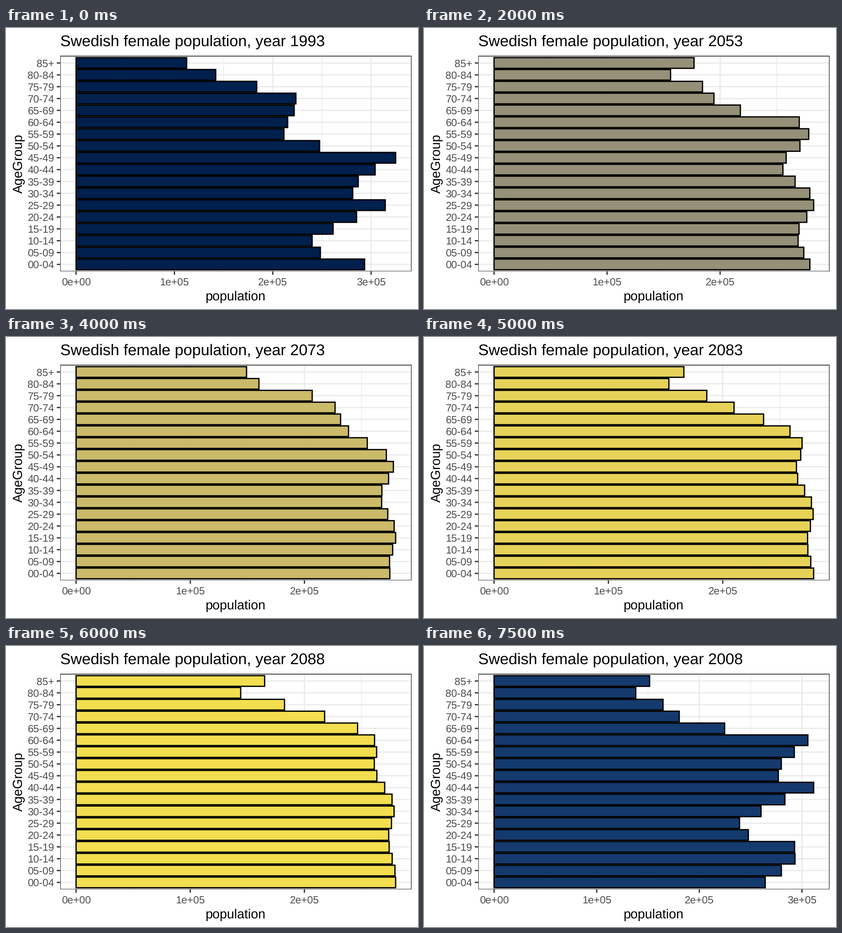
Recreate the animation shown at these times as a matplotlib script. Size 904 by 619 pixels, loop 8 s.

```python
import numpy as np
import matplotlib.pyplot as plt
from matplotlib.animation import FuncAnimation
from matplotlib.colors import LinearSegmentedColormap
from matplotlib.patches import Rectangle

plt.rcParams.update({
    "font.family": "Liberation Sans",
    "text.hinting": "none",
    "path.snap": False,
})

W, H, DPI = 904, 619, 72            # at 72 dpi one point is one pixel
LEFT, RIGHT, TOP, BOTTOM = 118.7, 890.0, 61.4, 536.4
THICK, THIN, TICK = 2.78, 1.39, 7.2
GRID, DARK, GREY = "#ebebeb", "#333333", "#4d4d4d"

# Women by five-year age group in the first year (thousands)
START = np.array([293.395, 248.369, 240.012, 261.346, 285.209, 314.388,
                  281.290, 286.923, 304.108, 324.946, 247.613, 211.351,
                  215.140, 221.764, 223.506, 183.654, 141.990, 112.424])
# Person-years lived per age group in the life table (thousands)
LIVED = np.array([497.487, 497.138, 496.901, 496.531, 495.902, 495.168,
                  494.213, 492.760, 490.447, 486.613, 480.665, 471.786,
                  457.852, 436.153, 402.775, 350.358, 271.512, 291.707])
# Yearly births per woman, ages 15-19 to 45-49
FERTILITY = np.array([.0120, .0908, .1499, .1125, .0441, .0074, .0003])
GIRLS = 1 / 2.05


def project(pop):
    """Move the population five years ahead."""
    nxt = np.empty_like(pop)
    nxt[1:-1] = pop[:-2] * LIVED[1:-1] / LIVED[:-2]
    nxt[-1] = (pop[-2] + pop[-1]) * LIVED[-1] / (LIVED[-2] + LIVED[-1])
    mothers = (pop[3:10] + nxt[3:10]) / 2
    nxt[0] = 5 * GIRLS * (FERTILITY @ mothers) * LIVED[0] / 500
    return nxt


pops = [START]
for _ in range(20):
    pops.append(project(pops[-1]))

# Steps play in alphabetical order of their number: 1, 10, 11, ... 19, 2, 20 ...
ORDER = sorted(range(1, 22), key=str)[:16]

cividis = LinearSegmentedColormap.from_list("steps", [
    "#00204d", "#00336f", "#39486b", "#575c6d", "#707173",
    "#8a8779", "#a69d75", "#c4b56c", "#e4cf5b", "#ffea46"], N=1024)

fig = plt.figure(figsize=(W / DPI, H / DPI), dpi=DPI, facecolor="white")
ax = fig.add_axes([0, 0, 1, 1])
ax.set(xlim=(0, W), ylim=(H, 0))
ax.axis("off")

panel = Rectangle((LEFT, TOP), RIGHT - LEFT, BOTTOM - TOP,
                  fc="none", ec=DARK, lw=THICK, zorder=5)
ax.add_patch(panel)
panel.set_clip_path(Rectangle((LEFT, TOP), RIGHT - LEFT, BOTTOM - TOP,
                              transform=ax.transData))

ZERO = LEFT + (RIGHT - LEFT) * 0.05 / 1.1
SPAN = (RIGHT - LEFT) / 1.1
STEP = (BOTTOM - TOP) / 18.2


def line(xs, ys, color, width, z):
    return ax.plot(xs, ys, color=color, lw=width, zorder=z,
                   solid_capstyle="butt")[0]


def label(x, y, text, size, color="black", ha="center", **kw):
    return ax.text(x, y, text, size=size, color=color, ha=ha,
                   va="baseline", zorder=6, **kw)


title = label(LEFT + 0.5, 40, "", 34.3, ha="left")
label((LEFT + RIGHT) / 2 - 1, 600, "population", 28.6)
label(35.5, (TOP + BOTTOM) / 2, "AgeGroup", 28.6,
      rotation=90, rotation_mode="anchor")

bars = []
for i in range(18):
    y = BOTTOM - (0.6 + i) * STEP
    name = "85+" if i == 17 else f"{5 * i:02d}-{5 * i + 4:02d}"
    label(106, y + 8.3, name, 22.9, GREY, "right")
    line([LEFT - TICK, LEFT], [y, y], DARK, THICK, 4)
    line([LEFT, RIGHT], [y, y], GRID, THICK, 2)
    bar = Rectangle((ZERO, y - 0.45 * STEP), 1, 0.9 * STEP,
                    ec="black", lw=THICK, joinstyle="miter", zorder=3)
    bars.append(ax.add_patch(bar))

minors = [(v, line([0, 0], [TOP, BOTTOM], GRID, THIN, 1))
          for v in (50, 150, 250)]
majors = [(v, line([0, 0], [TOP, BOTTOM], GRID, THICK, 2),
           line([0, 0], [BOTTOM, BOTTOM + TICK], DARK, THICK, 4),
           label(0, 567, f"{v // 100}e+0{5 if v else 0}", 22.9, GREY))
          for v in (0, 100, 200, 300)]


def draw(frame):
    step = ORDER[frame] - 1
    pop = pops[step]
    scale = SPAN / pop.max()
    title.set_text(f"Swedish female population, year {1993 + 5 * step}")
    for bar, value in zip(bars, pop):
        bar.set_width(value * scale)
        bar.set_facecolor(cividis(step / 20))
    for value, *parts in minors + majors:
        x = ZERO + value * scale
        for part in parts:
            part.set_visible(x <= RIGHT)
            if hasattr(part, "set_xdata"):
                part.set_xdata([x, x])
            else:
                part.set_x(x)
    return []


anim = FuncAnimation(fig, draw, frames=len(ORDER), interval=500,
                     repeat=True, repeat_delay=0)
plt.show()
```
